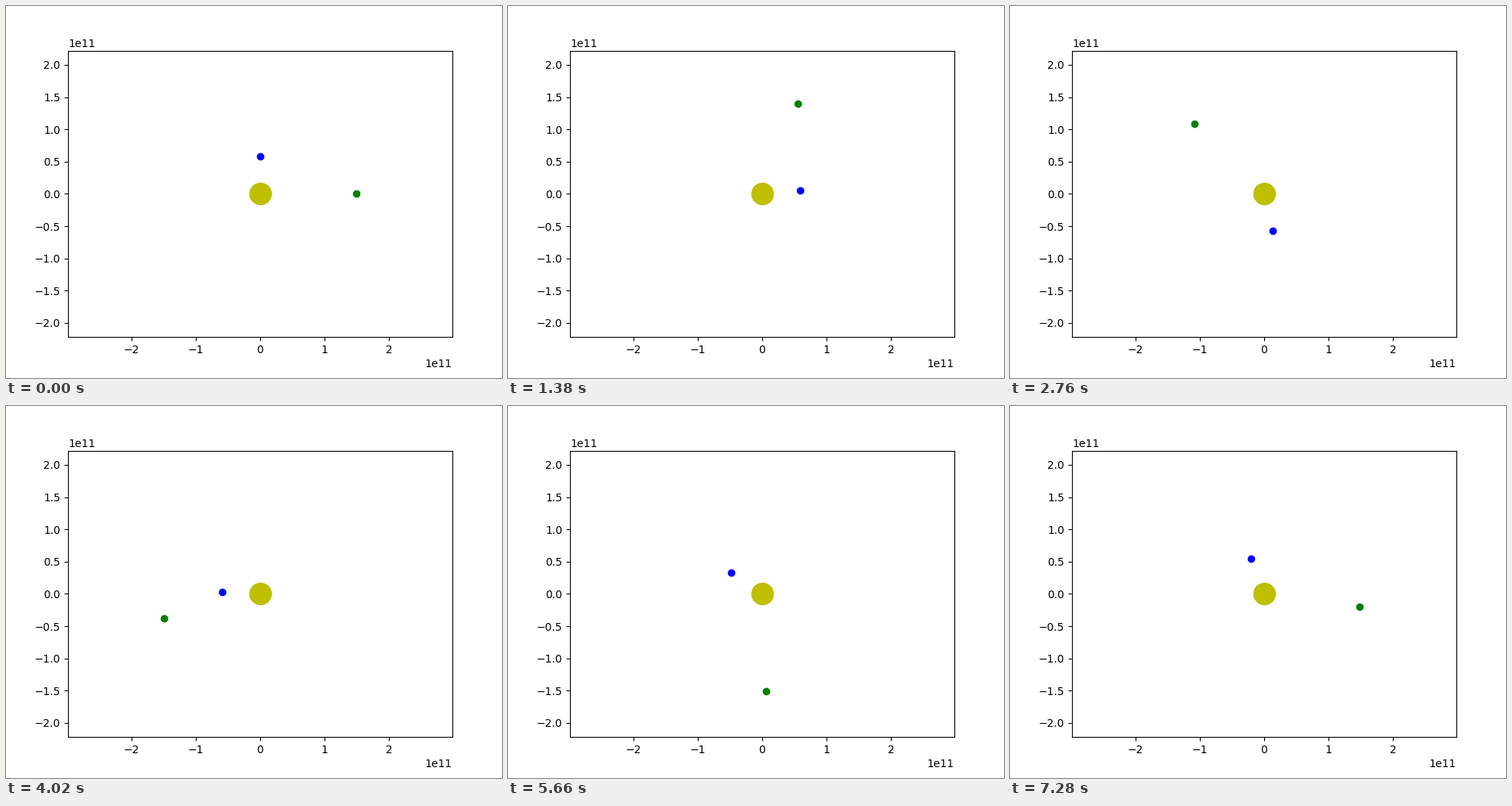
A matplotlib script that plays this animation: 640 by 480 pixels, repeating every 7300 ms.

```python
import numpy as np
import matplotlib.pyplot as plt
from matplotlib.animation import FuncAnimation

FRAMES = 365  # one day per frame
INTERVAL = 20
LIMIT = 2.98e11


def orbit(day, perihelion, period, ecc, start):
    """Kepler orbit around the origin, starting at perihelion at angle start."""
    mean = 2 * np.pi * day / period
    anomaly = mean
    for _ in range(8):
        anomaly = mean + ecc * np.sin(anomaly)
    a = perihelion / (1 - ecc)
    x = a * (np.cos(anomaly) - ecc)
    y = a * np.sqrt(1 - ecc**2) * np.sin(anomaly)
    c, s = np.cos(start), np.sin(start)
    return c * x - s * y, s * x + c * y


fig, ax = plt.subplots(figsize=(6.4, 4.8), dpi=100)
box = ax.get_window_extent()
ax.set_xlim(-LIMIT, LIMIT)
ax.set_ylim(-LIMIT * box.height / box.width, LIMIT * box.height / box.width)

ax.plot([0], [0], "yo", markersize=20)
outer, = ax.plot([], [], "go")
inner, = ax.plot([], [], "bo")

planets = [
    (outer, (1.49e11, 371.6, 0.0154, 0)),
    (inner, (5.8e10, 89.75, 0.0117, np.pi / 2)),
]


def update(day):
    for dot, params in planets:
        x, y = orbit(day, *params)
        dot.set_data([x], [y])
    return [dot for dot, _ in planets]


anim = FuncAnimation(fig, update, frames=FRAMES, interval=INTERVAL,
                     repeat=True, repeat_delay=0, blit=True)
plt.show()
```
